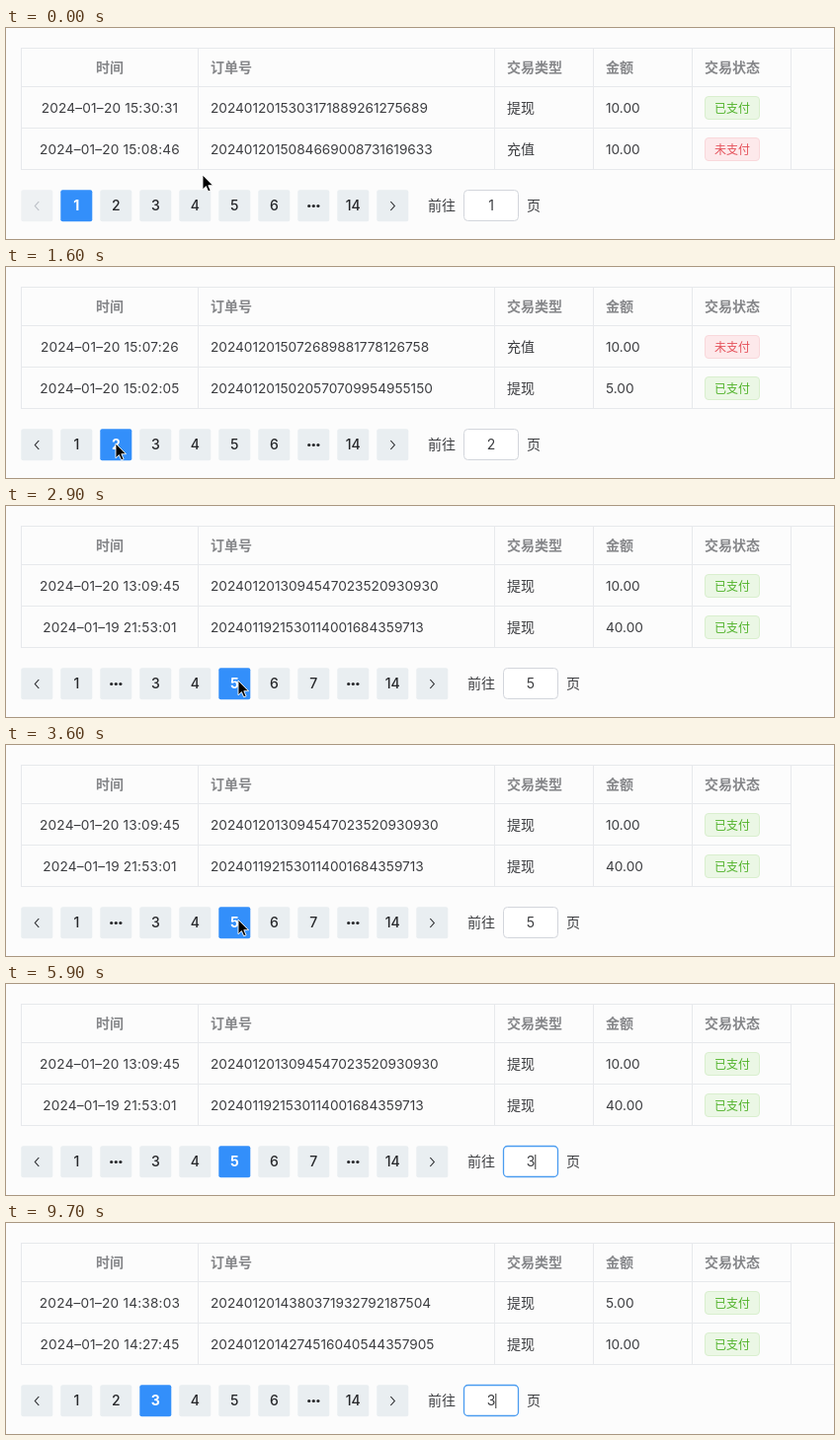
Recreate the animation shown at these times as an HTML page. Size 838x214 px, loop 9.8 s.

```html
<!DOCTYPE html>
<html lang="zh-CN">
<head>
<meta charset="utf-8">
<style>
  html, body { margin: 0; width: 100%; height: 100%; overflow: hidden; background: #fcfcfc; }
  svg { display: block; }
  text { font: 13.65px Inter, "Noto Sans CJK SC", "Noto Sans CJK", sans-serif; fill: #3c3d40; white-space: pre; }
  .mid { text-anchor: middle; }
  .date { letter-spacing: .2px; }
  .cjk { font-size: 14px; }
  .head { font-size: 14px; font-weight: 600; fill: #858689; }
  .tag { font-size: 12px; }
  .num { font-size: 14px; fill: #26272a; }
</style>
</head>
<body>
<svg id="stage" width="838" height="214"></svg>
<script>
const LOOP = 9800, LAST_PAGE = 14, BLUE = '#338ffa';
const stage = document.getElementById('stage');

// [time, order number, type, amount, paid]
const pages = {
  1: [['2024–01–20 15:30:31', '2024012015303171889261275689', '提现', '10.00', true],
      ['2024–01–20 15:08:46', '2024012015084669008731619633', '充值', '10.00', false]],
  2: [['2024–01–20 15:07:26', '2024012015072689881778126758', '充值', '10.00', false],
      ['2024–01–20 15:02:05', '2024012015020570709954955150', '提现', '5.00', true]],
  3: [['2024–01–20 14:38:03', '2024012014380371932792187504', '提现', '5.00', true],
      ['2024–01–20 14:27:45', '2024012014274516040544357905', '提现', '10.00', true]],
  5: [['2024–01–20 13:09:45', '2024012013094547023520930930', '提现', '10.00', true],
      ['2024–01–19 21:53:01', '2024011921530114001684359713', '提现', '40.00', true]],
};

// Pointer path: [ms, x, y]
const path = [[0, 199, 149], [200, 199, 149], [1100, 111, 179], [1900, 111, 179], [2300, 166, 181],
              [2700, 235, 177], [3600, 235, 177], [4000, 340, 200], [4400, 533, 182], [LOOP, 533, 182]];

const text = (x, y, str, cls = '', style = '') =>
  `<text x="${x}" y="${y + 5}" class="${cls}" style="${style}">${str}</text>`;
const box = (x, y, w, h, r, fill, stroke = 'none', line = 1) =>
  `<rect x="${x}" y="${y}" width="${w}" height="${h}" rx="${r}" fill="${fill}" stroke="${stroke}" stroke-width="${line}"/>`;
const line = (d, color, width = 1) =>
  `<path d="${d}" fill="none" stroke="${color}" stroke-width="${width}"/>`;

function pointerAt(t) {
  const i = path.findIndex(p => p[0] > t);
  const [t0, x0, y0] = path[i - 1], [t1, x1, y1] = path[i];
  const u = (t - t0) / (t1 - t0), e = u * u * (3 - 2 * u);
  return [x0 + (x1 - x0) * e, y0 + (y1 - y0) * e];
}

function tag(y, paid) {
  const [label, color, fill, stroke] = paid
    ? ['已支付', '#52b32c', '#ebf7e5', '#d9efce']
    : ['未支付', '#e5535c', '#fde9eb', '#f9d8db'];
  return box(707.5, y - 11.5, 55, 23, 3.5, fill, stroke) + text(735, y - .5, label, 'tag mid', `fill:${color}`);
}

function table(rows) {
  let out = line('M15 20.5H838M15 59.5H795M15 101.5H795M15 143.5H838' +
    [15.5, 194.5, 494.5, 594.5, 694.5, 794.5].map(x => `M${x} 20V144`).join(''), '#e7e9ec');
  out += text(105, 39.5, '时间', 'head mid');
  [[207, '订单号'], [507, '交易类型'], [607, '金额'], [707, '交易状态']]
    .forEach(([x, label]) => out += text(x, 39.5, label, 'head'));
  rows.forEach(([time, order, type, amount, paid], i) => {
    const y = 81 + 42 * i;
    out += text(105, y, time, 'date mid') + text(207, y, order) + text(507, y - .5, type, 'cjk') +
      text(607, y, amount) + tag(y, paid);
  });
  return out;
}

function pagerItems(page) {
  const middle = page < 5 ? [2, 3, 4, 5, 6] : ['more', page - 2, page - 1, page, page + 1, page + 2];
  return ['prev', 1, ...middle, 'more', LAST_PAGE, 'next'];
}

function pager(page, hovered) {
  return pagerItems(page).map((item, i) => {
    const x = 15.3 + 40 * i, c = x + 16, off = item === 'prev' && page === 1;
    const active = item === page;
    const color = active ? '#fff' : off ? '#b9bdc4' : i === hovered ? BLUE : '#26272a';
    let mark;
    if (item === 'prev') mark = line(`M${c + 2} 176l-4 4.5 4 4.5`, color, 1.1);
    else if (item === 'next') mark = line(`M${c - 2} 176l4 4.5-4 4.5`, color, 1.1);
    else if (item === 'more') mark = [-4.6, 0, 4.6].map(d => `<circle cx="${c + d}" cy="180.5" r="1.6" fill="${color}"/>`).join('');
    else mark = text(c, 180, item, 'num mid', `fill:${color};font-weight:${active ? 700 : 500}`);
    return box(x, 164.2, 32, 32, 2, active ? BLUE : off ? '#eef1f3' : '#e9eef1') + mark;
  }).join('');
}

function jumper(x, value, focused, caret) {
  return text(x, 180, '前往', 'cjk') +
    box(x + 36.5, 164.5, 55, 31, 4, '#fff', focused ? '#4b9cf0' : '#d3d6dc', focused ? 1.3 : 1) +
    text(x + 64, 180, value, 'num mid', 'fill:#3c3d40') +
    (caret ? line(`M${x + (value ? 68.8 : 64)} 173v15`, '#333') : '') +
    text(x + 100, 180, '页', 'cjk');
}

function pointer(x, y, kind) {
  const shapes = {
    arrow: '<path d="M0 0V14.8l3.4-3.2 2.3 5.2 2.4-1-2.3-5.1h4.7z" fill="#000" stroke="#fff" stroke-width=".9"/>',
    hand: '<path transform="translate(1.3 .3)" d="M-1.8 10.5V1.8q0-1.6 1.6-1.6t1.6 1.6V7q1.2-1.2 2.7 0 1.6-1 2.8.5 2-.5 2.3 1.4v3q0 2-1.5 3.6v1.8h-7.5v-1.4l-4.2-5.2q-1-1.7.4-2.2 1-.2 1.8 2zM2.2 11v3M4.5 11v3M6.8 11v3" fill="#fff" stroke="#000" stroke-width="1.2" stroke-linejoin="round"/>',
    beam: '<path d="M-3-8q3 0 3 2V6q0 2-3 2M3-8q-3 0-3 2V6q0 2 3 2" fill="none" stroke="#222"/>',
  };
  return `<g transform="translate(${x.toFixed(1)} ${y.toFixed(1)})">${shapes[kind]}</g>`;
}

function scene(t) {
  const page = t < 1500 ? 1 : t < 2900 ? 2 : t < 6000 ? 5 : 3;
  const items = pagerItems(page), jumpX = 15 + 40 * items.length + 12;
  const [x, y] = pointerAt(t), shown = t < 5500;

  const slot = Math.floor((x - 15) / 40);
  const over = shown && y >= 164 && y < 196 && (x - 15) % 40 < 32 && slot < items.length;
  const hovered = over && items[slot] !== page ? slot : -1;
  const inInput = y < 196 && x > jumpX + 36 && x < jumpX + 92;
  const kind = inInput ? 'beam' : hovered >= 0 && t > 1300 ? 'hand' : 'arrow';

  const focused = t >= 4500;
  const beat = Math.floor((t - (t < 5500 ? 4500 : 5600)) / 500) % 2 === 0;
  const caret = focused && (beat || (t >= 5500 && t < 6100));
  const value = t < 5500 ? page : t < 5700 ? '' : 3;

  return table(pages[page]) + pager(page, hovered) + jumper(jumpX, value, focused, caret) +
    (shown ? pointer(x, y, kind) : '');
}

let last;
function draw() {
  const markup = scene(performance.now() % LOOP);
  if (markup !== last) stage.innerHTML = last = markup;
  requestAnimationFrame(draw);
}
draw();
</script>
</body>
</html>
```
